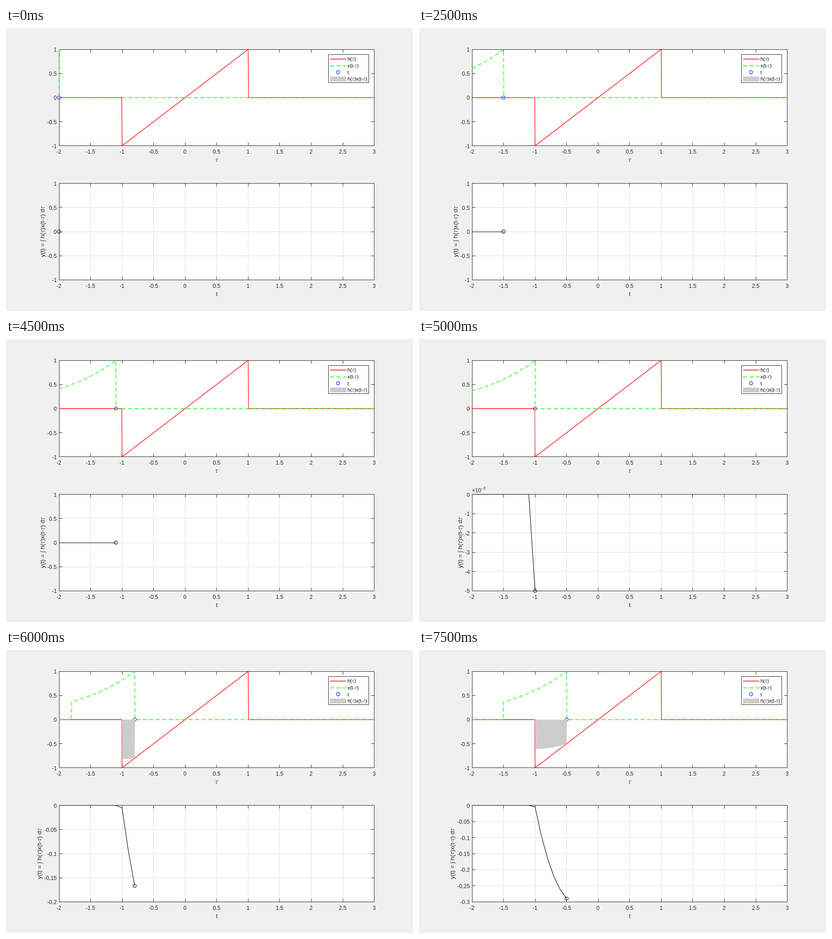
Write an HTML page with a canvas that moves like this. It is 898 by 624 pixels and loops after 8 s.

```html
<!DOCTYPE html>
<html lang="en">
<head>
<meta charset="utf-8">
<title>Convolution</title>
<style>
html, body { margin: 0; width: 100%; height: 100%; overflow: hidden; background: #f0f0f0; }
canvas { display: block; }
</style>
</head>
<body>
<canvas id="stage" width="898" height="624"></canvas>
<script>
const ctx = document.getElementById('stage').getContext('2d');
const SANS = '"Liberation Sans", Arial, sans-serif';
const SERIF = '"Liberation Serif", "Times New Roman", serif';
const GREEK = '"Noto Serif", serif';
const INK = '#262626', GRID = '#dedede', DX = 0.005, EPS = 1e-9;
const LEFT = 117, RIGHT = 812.6, HEIGHT = 212.8;
const UPPER = 47, LOWER = 342.6;
const DASH = [9, 5.4], BOLD = 1.3;
const STEP_MS = 500, STEPS = 16;

const h = u => Math.abs(u) <= 1 + EPS ? u : 0;
const x = u => u >= -EPS && u <= 1 + EPS ? Math.exp(-u) : 0;
const taus = Array.from({ length: 1001 }, (_, i) => -2 + i * DX);
const timeAt = k => -2 + k / 10;

// Trapezoid rule; both ends of the product are zero or negligible.
const area = t => taus.reduce((sum, u) => sum + h(u) * x(t - u) * DX, 0);
const output = Array.from({ length: STEPS }, (_, k) => area(timeAt(k)));

const crisp = v => Math.floor(v) + 0.5;
const px = v => LEFT + (v + 2) / 5 * (RIGHT - LEFT);

function makeAxes(top, lo, hi, step, scale = 1) {
  const map = v => top + (hi - v) / (hi - lo) * HEIGHT;
  const ticks = [];
  for (let i = 0; i <= Math.round((hi - lo) / step); i++) {
    const v = lo + i * step;
    ticks.push({ v, label: String(+(v * scale).toFixed(4)) });
  }
  return { map, ticks, scale, top: crisp(top), bottom: crisp(top + HEIGHT),
    py: v => Math.abs(v) < EPS ? crisp(map(0)) : map(v) };
}

function lowerAxes(k) {
  const min = Math.min(...output.slice(0, k + 1));
  if (min > -1e-6) return makeAxes(LOWER, -1, 1, 0.5);
  if (min > -0.0051) return makeAxes(LOWER, -0.005, 0, 0.001, 1000);
  if (min > -0.1) return makeAxes(LOWER, -0.1, 0, 0.02);
  return makeAxes(LOWER, -Math.ceil(-min / 0.05) * 0.05, 0, 0.05);
}

function path(points, color, width = 1, dash = []) {
  ctx.beginPath();
  points.forEach(([a, b]) => ctx.lineTo(a, b));
  ctx.strokeStyle = color;
  ctx.lineWidth = width;
  ctx.setLineDash(dash);
  ctx.stroke();
  ctx.setLineDash([]);
}

function box(x0, y0, x1, y1) {
  ctx.fillStyle = '#fff';
  ctx.fillRect(x0, y0, x1 - x0, y1 - y0);
  ctx.strokeStyle = INK;
  ctx.lineWidth = 1;
  ctx.strokeRect(x0, y0, x1 - x0, y1 - y0);
}

function circle(cx, cy, color) {
  ctx.beginPath();
  ctx.arc(cx, cy, 3.6, 0, Math.PI * 2);
  ctx.strokeStyle = color;
  ctx.lineWidth = 1.1;
  ctx.stroke();
}

function text(str, tx, ty, size, align = 'left', color = INK) {
  ctx.font = `${size}px ${SANS}`;
  ctx.textAlign = align;
  ctx.fillStyle = color;
  ctx.fillText(str, tx, ty);
}

// Greek tau and the integral sign are set in serif faces.
function formula(str, tx, ty, size, align = 'left', color = INK) {
  const runs = str.split(/([τ∫])/).filter(Boolean).map(s => {
    const font = s === 'τ' ? `italic ${size}px ${GREEK}`
      : s === '∫' ? `${size}px ${SERIF}` : `${size}px ${SANS}`;
    ctx.font = font;
    return { s, font, w: ctx.measureText(s).width };
  });
  if (align === 'center') tx -= runs.reduce((sum, r) => sum + r.w, 0) / 2;
  ctx.textAlign = 'left';
  for (const r of runs) {
    ctx.font = r.font;
    ctx.fillStyle = r.s === 'τ' ? '#505050' : color;
    ctx.fillText(r.s, tx, ty);
    tx += r.w;
  }
}

function drawAxes(ax, grid) {
  const { top, bottom } = ax, x0 = crisp(LEFT), x1 = crisp(RIGHT);
  box(x0, top, x1, bottom);
  for (let i = 0; i <= 10; i++) {
    const v = -2 + i / 2, gx = crisp(px(v));
    if (grid && i % 10) path([[gx, top + 0.5], [gx, bottom - 0.5]], GRID);
    path([[gx, top], [gx, top + 7]], INK);
    path([[gx, bottom], [gx, bottom - 7]], INK);
    text(String(v), px(v) - 0.3, bottom + 17, 12, 'center');
  }
  for (const { v, label } of ax.ticks) {
    const gy = crisp(ax.map(v));
    if (grid && gy > top && gy < bottom) path([[x0 + 7, gy], [x1 - 7, gy]], GRID);
    path([[x0, gy], [x0 + 7, gy]], INK);
    path([[x1, gy], [x1 - 7, gy]], INK);
    text(label, 111.8, ax.map(v) + 5, 12, 'right');
  }
  if (ax.scale !== 1) {
    text('×10', 117, 338, 12);
    text('-3', 117 + ctx.measureText('×10').width + 1, 332, 9.5);
  }
}

function drawLegend() {
  box(711.5, 58.5, 800.5, 120.5);
  path([[715, 68.5], [751, 68.5]], '#f00', BOLD);
  path([[715, 83.5], [751, 83.5]], '#0f0', BOLD, DASH);
  circle(732.7, 97.5, '#00f');
  ctx.fillStyle = '#ccc';
  ctx.fillRect(715, 107, 36, 11);
  ['h(τ)', 'x(t-τ)', 't', 'h(τ)x(t-τ)'].forEach((s, i) =>
    formula(s, 753.5, 72 + i * 14.8, 10.8, 'left', '#000'));
}

function drawUpper(t) {
  const ax = makeAxes(UPPER, -1, 1, 0.5);
  const curve = f => taus.map(u => [px(u), ax.py(f(u))]);
  drawAxes(ax, false);
  formula('τ', 464.7, 295, 13.2, 'center');
  path(curve(h), '#f00', BOLD);
  path(curve(u => x(t - u)), '#0f0', BOLD, DASH);
  circle(px(t), ax.map(0), '#00f');

  ctx.beginPath();
  curve(u => h(u) * x(t - u)).forEach(([a, b]) => ctx.lineTo(a, b));
  ctx.closePath();
  ctx.fillStyle = '#ccc';
  ctx.fill();
  drawLegend();
}

function drawLower(k) {
  const ax = lowerAxes(k);
  drawAxes(ax, true);
  text('t', 465, 591, 13.2, 'center');

  ctx.font = `12px ${SANS}`;
  const wide = Math.max(...ax.ticks.map(d => ctx.measureText(d.label).width));
  ctx.save();
  ctx.translate(105.3 - wide, 449);
  ctx.rotate(-Math.PI / 2);
  formula('y(t) = ∫ h(τ)x(t-τ) dτ', 0, 0, 13.3, 'center');
  ctx.restore();

  path(output.slice(0, k + 1).map((y, i) => [px(timeAt(i)), ax.py(y)]), '#000', 1.1);
  circle(px(timeAt(k)), ax.map(output[k]), '#000');
}

function draw(ms) {
  const k = Math.floor(ms / STEP_MS) % STEPS;
  ctx.lineJoin = 'round';
  ctx.fillStyle = '#f0f0f0';
  ctx.fillRect(0, 0, 898, 624);
  drawUpper(timeAt(k));
  drawLower(k);
}

let start = null;
function tick(now) {
  if (start === null) start = now;
  draw(now - start);
  requestAnimationFrame(tick);
}
draw(0);
requestAnimationFrame(tick);
</script>
</body>
</html>
```
